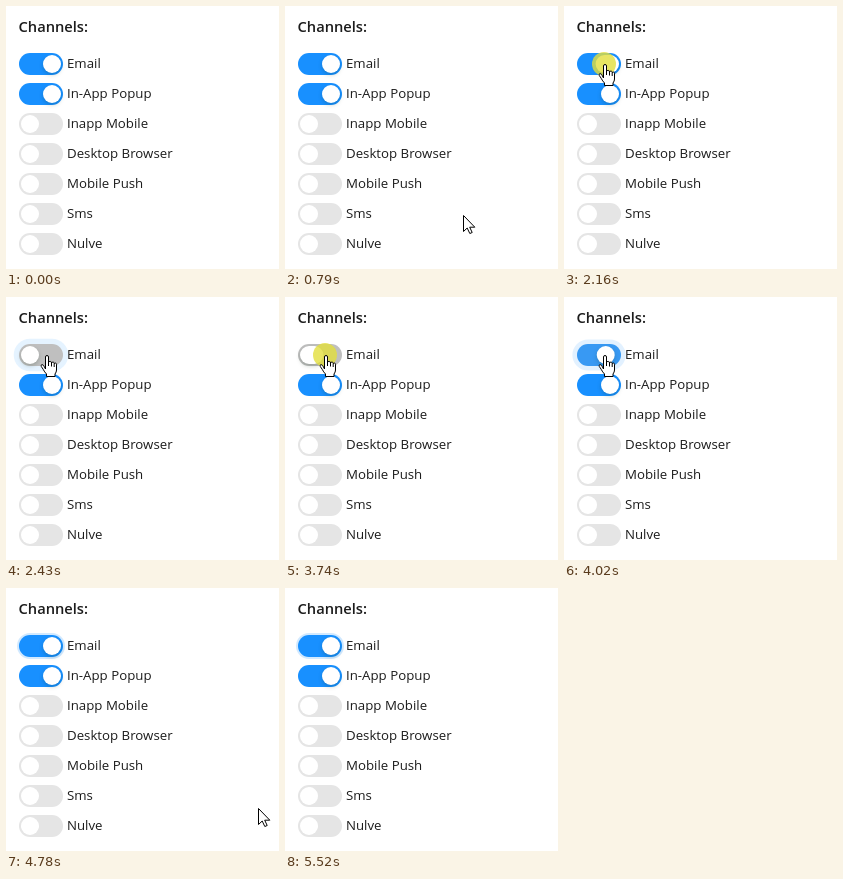
An HTML page for the animation above (5590 ms loop, 273x263 px).

```html
<!DOCTYPE html>
<html lang="en">
<head>
<meta charset="utf-8">
<title>Channels</title>
<style>
  html, body { margin: 0; width: 100%; height: 100%; overflow: hidden; background: #fff; }
  svg { display: block; width: 100%; height: 100%; }
  text { font: 13.25px "Open Sans", "Noto Sans", sans-serif; fill: #1c1c1c; }
  .title { font-size: 14.7px; font-weight: 600; }
  .live .knob { filter: drop-shadow(0 2px 2px rgba(0, 35, 11, .2)); }
  #cursor path { fill: #fff; stroke: #000; stroke-width: 1; stroke-linejoin: round; }
  #cursor .line { fill: none; }
</style>
</head>
<body>
<svg id="stage" viewBox="0 0 273 263">
  <text class="title" x="12.5" y="26">Channels:</text>
  <rect id="wave" fill="#1890ff"/>
  <rect id="ring" x="11" y="45" width="48" height="26" rx="13" fill="#d1e9ff"/>
  <g id="rows"></g>
  <circle id="press" cx="40" cy="58" r="12" fill="#e2de3c" fill-opacity=".8"/>
  <g id="cursor">
    <g id="arrow"><path d="M.5 .5V16.5L4.2 13l2.6 5.5 2.4-1-2.5-5.3H11.8z"/></g>
    <g id="beam"><path class="line" d="M-3 -7.5h2q1 0 1 1v13q0 1-1 1h-2M3 -7.5h-2q-1 0-1 1M3 7.5h-2q-1 0-1-1"/></g>
    <g id="hand" transform="translate(-7 0)">
      <path d="M5.5 14V2a1.5 1.5 0 0 1 3 0V7.5a1.5 1.3 0 0 1 3 .5a1.4 1.3 0 0 1 2.7 .8a1.2 1.2 0 0 1 2.3 1V15q0 2-1.5 4v2.5h-8.5v-2.5q-2-2-3.2-4.5l-2-3q-.7-1.5.7-2 1.5-.3 3.5 4.5z"/>
      <path class="line" d="M8.5 7v4M11.5 8v3.5M14.2 9v3"/>
    </g>
  </g>
</svg>
<script>
const LOOP = 5590, STEP = 68.5, START = 520;
const BLUE = [24, 144, 255], GREY = [191, 191, 191];
const labels = ["Email", "In-App Popup", "Inapp Mobile", "Desktop Browser", "Mobile Push", "Sms", "Nulve"];
const clicks = [{ down: 2080, up: 2220, end: 3720 }, { down: 3720, up: 3870, end: 4200 }];
// time, x, y of the pointer's hot spot
const path = [
  [520, 233, 248], [650, 211, 234], [790, 179, 210], [930, 129, 167], [1065, 79.5, 121],
  [1210, 62, 94], [1405, 44, 63], [1540, 41, 58], [4160, 41, 58], [4225, 57, 63],
  [4300, 92, 77], [4360, 132.5, 97], [4510, 179, 143], [4650, 220, 187], [4835, 270, 239]
];

const $ = id => document.getElementById(id);
const clamp = v => Math.min(1, Math.max(0, v));
const mix = (a, b, p) => a + (b - a) * p;
const smooth = p => p * p * (3 - 2 * p);
const outCirc = p => Math.sqrt(1 - (1 - p) ** 2);
const rowY = i => 58 + 30 * i;
const show = (el, on) => el.setAttribute("display", on ? "inline" : "none");
const set = (el, attrs) => { for (const k in attrs) el.setAttribute(k, attrs[k]); };

$("rows").innerHTML = labels.map((label, i) => {
  const on = i < 2, y = rowY(i);
  return `<g class="${on ? "live" : ""}">
    <rect class="track" x="13" y="${y - 11}" width="44" height="22" rx="11" fill="${on ? "#1890ff" : "#e5e5e5"}"/>
    <rect class="knob" x="${on ? 37 : 15}" y="${y - 9}" width="18" height="18" rx="9" fill="#fff"/>
    <text x="61" y="${y + 4}">${label}</text></g>`;
}).join("");
const [track, knob] = $("rows").firstElementChild.children;
const labelEnds = [...document.querySelectorAll("#rows text")].map(t => 61 + t.getComputedTextLength());

function pointerAt(t) {
  const next = path.findIndex(k => k[0] >= t);
  const i = next < 0 ? path.length - 1 : Math.max(1, next);
  const [a, b] = [path[i - 1], path[i]];
  const p = clamp((t - a[0]) / (b[0] - a[0]));
  return [mix(a[1], b[1], p), mix(a[2], b[2], p)];
}

function cursorShape(x, y) {
  const i = Math.round((y - 58) / 30);
  if (i < 0 || i >= labels.length || Math.abs(y - rowY(i)) > 10) return "arrow";
  if (x > 13 && x < 57) return "hand";
  return x > 61 && x < labelEnds[i] ? "beam" : "arrow";
}

function drawSwitch(t) {
  const [off, on] = clicks.map(c => smooth(clamp((t - c.up) / 200)));
  const checked = 1 - off + on;
  const pressed = clicks.some(c => t >= c.down && t < c.up);
  const extra = pressed ? 5.4 : 0;
  set(knob, { x: mix(15, 37, checked) - extra * checked, width: 18 + extra });
  set(track, { fill: `rgb(${GREY.map((g, i) => Math.round(mix(g, BLUE[i], checked)))})` });
  show($("press"), pressed);
  show($("ring"), t >= 4200);

  const click = clicks.find(c => t >= c.up && t < c.end);
  show($("wave"), click);
  if (click) {
    const age = t - click.up, grow = 6 * outCirc(clamp(age / 400));
    set($("wave"), {
      x: 13 - grow, y: 47 - grow, width: 44 + 2 * grow, height: 22 + 2 * grow, rx: 11 + grow,
      "fill-opacity": .2 * (1 - outCirc(clamp(age / 2000)))
    });
  }
}

function drawCursor(t) {
  const visible = t >= 515 && t < 4890;
  show($("cursor"), visible);
  if (!visible) return;
  const [x, y] = pointerAt(t), shape = cursorShape(x, y);
  set($("cursor"), { transform: `translate(${Math.round(x)} ${Math.round(y)})` });
  for (const id of ["arrow", "beam", "hand"]) show($(id), id === shape);
}

// The picture advances in even steps and rests while the pointer is idle.
function stepped(t) {
  const s = START + STEP * Math.floor((t - 511) / STEP);
  if (s > 2400 && s < 3100) return 2430;
  if (s > 3100 && s < 3720) return 3120;
  return s;
}

function frame(now) {
  const t = stepped(now % LOOP);
  drawSwitch(t);
  drawCursor(t);
  requestAnimationFrame(frame);
}
frame(performance.now());
</script>
</body>
</html>
```
